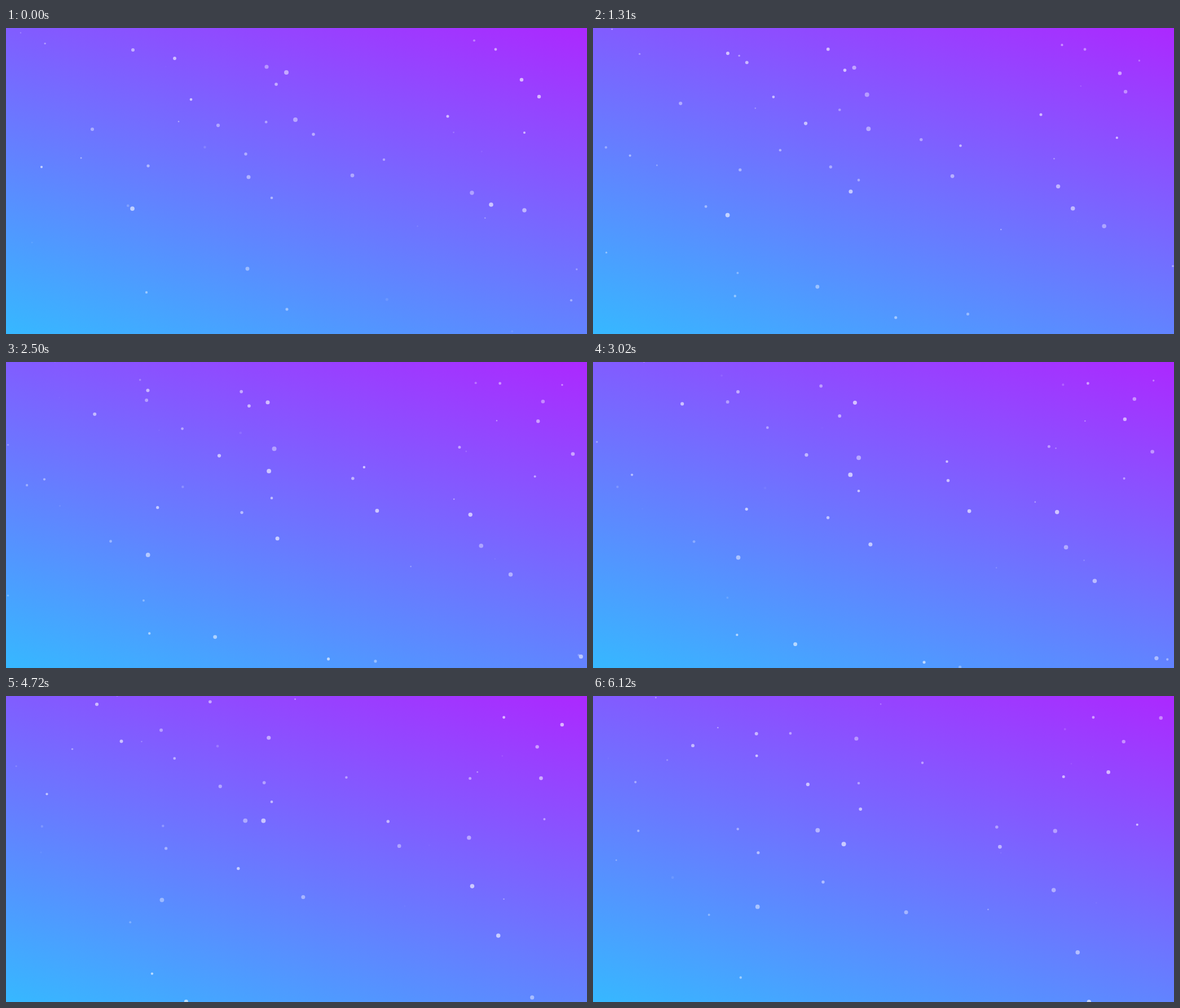
An HTML page with a canvas that plays this animation: 1030x544 px, repeating every 6.19 s.

```html
<!DOCTYPE html>
<html lang="en">
<head>
<meta charset="utf-8">
<title>Drifting stars</title>
<style>
html, body { margin: 0; width: 100%; height: 100%; overflow: hidden; background: #7170ff; }
canvas { display: block; width: 1030px; height: 544px; }
</style>
</head>
<body>
<canvas id="sky" width="1030" height="544"></canvas>
<script>
const W = 1030, H = 544;
const LOOP = 6190, STEP = 65.6, LAST = 93;
const FAINT_COUNT = 26;
const ctx = document.getElementById('sky').getContext('2d');

// Main stars, largest first: x, y and drift in px/s
const paths = [
  [497, 79, -8.6, 30.2], [513, 163, -18.8, 12.4], [224, 321, 11.1, 8.8], [860, 314, -7.1, 5.1],
  [919, 324, -9.8, 21.6], [826, 293, -1.1, -8.7], [1116, 510, -38.8, 5.5], [462, 69, 0.8, 1.1],
  [430, 265, 20.5, 19.6], [428, 428, -23, 24.4], [614, 262, 17.6, 1], [1068, 183, -25.3, -7.8],
  [914, 92, 15.2, -8.7], [945, 122, -0.7, -6.7], [376, 173, 0.8, -2.6], [153, 180, 1.7, -35],
  [225, 39, 10.6, 4.6], [299, 54, -20, 5.6], [401, -7, 12, 34.1], [479, 100, -24.8, -19],
  [545, 189, 28, 7.2], [425, 224, -2.8, 17.5], [252, 245, 6.7, 5.5], [498, 500, 29.5, 11.2],
  [783, 157, 8.4, -2.2], [868, 38, 3.1, 0], [328, 127, -6.2, -3.4], [471, 302, 0, -24.1],
  [670, 234, -14.1, -18.9], [249, 470, 2.1, 5], [63, 247, 2, -15.4], [919, 186, 7.5, 7]
];

function seeded(seed) {
  return () => (seed = (seed * 16807) % 2147483647) / 2147483647;
}
const random = seeded(2718);
const between = (a, b) => a + (b - a) * random();

// Main stars shimmer; faint ones fade out completely and return.
const mainStars = paths.map((path, i) => ({
  path,
  r: 4 - 2 * i / paths.length,
  base: 0.52, swing: 0.12,
  rate: between(0.8, 1.6), phase: between(0, 6.28)
}));
const faintStars = Array.from({ length: FAINT_COUNT }, () => ({
  path: [between(-40, W + 40), between(-40, H + 40), between(-20, 20), between(-20, 20)],
  r: between(1.2, 2.6),
  base: 0.22, swing: 0.22,
  rate: between(0.8, 1.8), phase: between(0, 6.28)
}));
const stars = [...mainStars, ...faintStars];

function makeSky(degrees) {
  const a = degrees * Math.PI / 180;
  const dx = Math.sin(a), dy = -Math.cos(a);
  const half = (W * Math.abs(dx) + H * Math.abs(dy)) / 2;
  const g = ctx.createLinearGradient(
    W / 2 - dx * half, H / 2 - dy * half,
    W / 2 + dx * half, H / 2 + dy * half);
  g.addColorStop(0, '#36b8ff');
  g.addColorStop(1, '#ac28ff');
  return g;
}
const sky = makeSky(17);

function drawStar({ path: [x, y, vx, vy], r, base, swing, rate, phase }, t) {
  ctx.globalAlpha = base + swing * Math.sin(rate * t + phase);
  ctx.beginPath();
  ctx.arc(x + vx * t, y + vy * t, r, 0, 2 * Math.PI);
  ctx.fill();
}

function draw(t) {
  ctx.globalAlpha = 1;
  ctx.fillStyle = sky;
  ctx.fillRect(0, 0, W, H);
  ctx.fillStyle = '#fff';
  for (const star of stars) drawStar(star, t);
}

const start = performance.now();
function tick() {
  const ms = (performance.now() - start) % LOOP;
  const step = Math.min(LAST, Math.floor(ms / STEP + 0.4));
  draw(step * STEP / 1000);
  requestAnimationFrame(tick);
}
tick();
</script>
</body>
</html>
```
